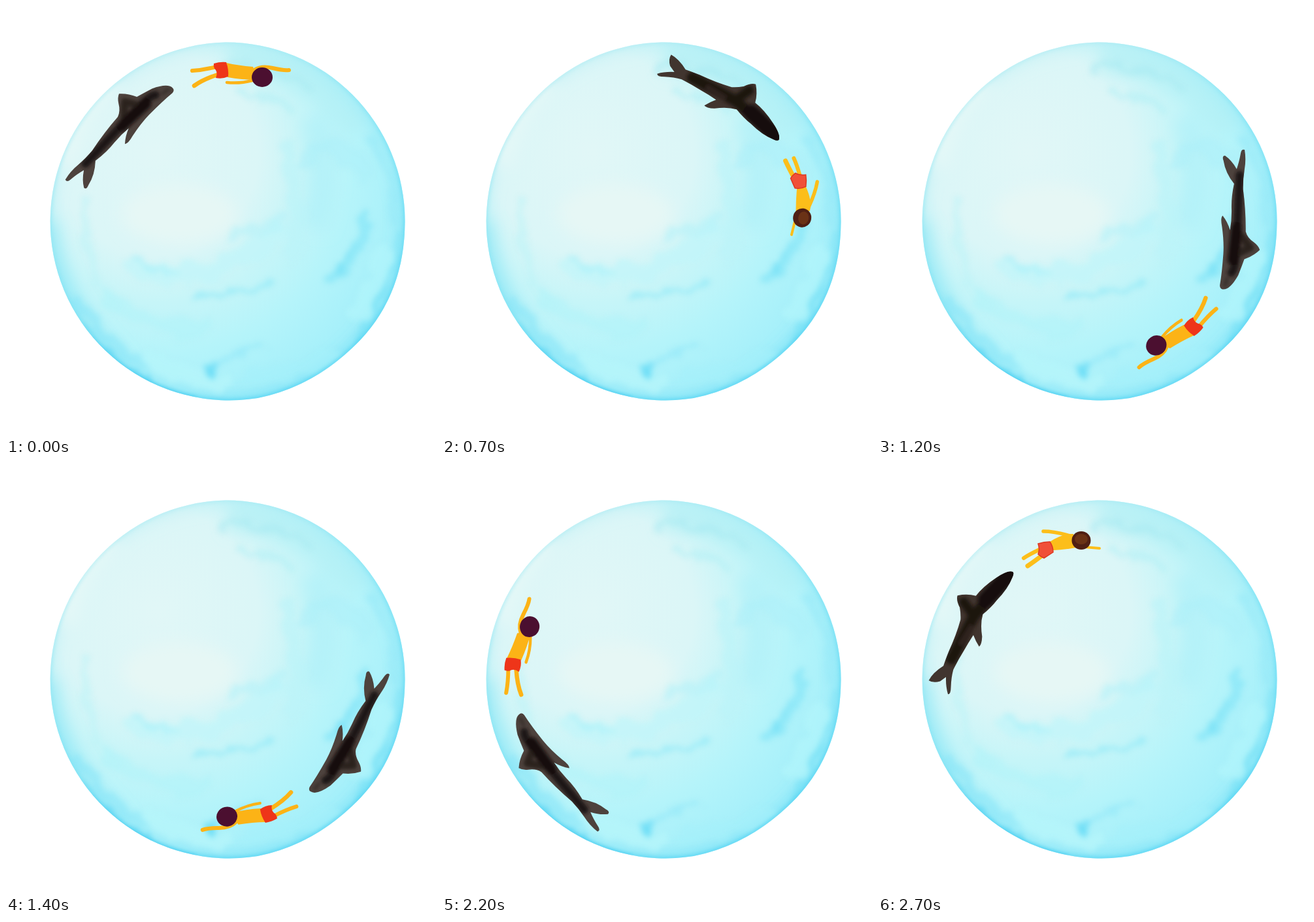
An HTML page for the animation above (2800 ms loop, 658 by 658 pixels).

```html
<!DOCTYPE html>
<html lang="en">
<head>
<meta charset="utf-8">
<title>Shark and swimmer</title>
<style>
  html, body { margin: 0; width: 100%; height: 100%; overflow: hidden; background: #fff; }
  svg { display: block; width: 100vw; height: 100vh; }
</style>
</head>
<body>
<svg viewBox="0 0 658 658">
  <defs>
    <radialGradient id="water" gradientUnits="userSpaceOnUse" cx="230" cy="225" r="410">
      <stop offset="0" stop-color="#e1f7f7"/>
      <stop offset=".38" stop-color="#dbf6f7"/>
      <stop offset=".56" stop-color="#c6f5f8"/>
      <stop offset=".75" stop-color="#b5f4fa"/>
      <stop offset="1" stop-color="#a3effa"/>
    </radialGradient>
    <linearGradient id="rim" x1=".1" y1=".1" x2=".6" y2="1">
      <stop offset="0" stop-color="#b8eff5"/>
      <stop offset=".5" stop-color="#7ee3f5"/>
      <stop offset="1" stop-color="#4fd2f3"/>
    </linearGradient>
    <clipPath id="disc"><path id="edge" d="M336 55.5A274 274 0 0 1 610.5 330Q610 450 528 525Q465 584 385 600A274 274 0 1 1 336 55.5Z"/></clipPath>
    <filter id="wash" filterUnits="userSpaceOnUse" x="0" y="0" width="658" height="658" color-interpolation-filters="sRGB">
      <feTurbulence type="fractalNoise" baseFrequency=".03" numOctaves="4" seed="4"/>
      <feDisplacementMap in="SourceGraphic" scale="34" xChannelSelector="R" yChannelSelector="G"/>
      <feGaussianBlur stdDeviation="4.5"/>
    </filter>
    <filter id="soft" filterUnits="userSpaceOnUse" x="0" y="0" width="658" height="658"><feGaussianBlur stdDeviation="12"/></filter>
    <filter id="fine" filterUnits="userSpaceOnUse" x="0" y="0" width="658" height="658"><feGaussianBlur stdDeviation="2.5"/></filter>
  </defs>

  <g clip-path="url(#disc)">
    <rect width="658" height="658" fill="url(#water)"/>
    <g filter="url(#soft)" fill="none">
      <circle cx="336.5" cy="330" r="280" stroke="url(#rim)" stroke-width="24" opacity=".5"/>
      <ellipse cx="265" cy="318" rx="88" ry="46" fill="#e6f7f5"/>
      <path d="M160 110Q100 170 90 245" stroke="#e4f8f7" stroke-width="34"/>
      <path d="M66 330Q72 450 180 552" stroke="#86e5f6" stroke-width="26" opacity=".6"/>
      <path d="M340 82Q470 90 540 190" stroke="#b3eff5" stroke-width="40" opacity=".7"/>
      <path d="M470 170Q500 260 470 340" stroke="#aef1f9" stroke-width="40" opacity=".6"/>
    </g>
    <g id="strokes" filter="url(#wash)" fill="none" stroke-linecap="round"></g>
    <use href="#edge" fill="none" stroke="url(#rim)" stroke-width="5" opacity=".7" filter="url(#fine)"/>
    <path d="M130 508Q190 578 290 600" fill="none" stroke="#28bfee" stroke-width="3" opacity=".7" filter="url(#fine)"/>
  </g>
  <g id="shark"></g>
  <g id="swimmer"></g>
</svg>

<script>
const $ = id => document.getElementById(id);
const STEPS = 28, STEP_MS = 100, CX = 336, CY = 330, DEG = Math.PI / 180;

// Brush strokes in the water: path, colour, width, opacity
const strokes = [
  ["M195 400Q300 440 420 345", "#c0f5f9", 30, .7],
  ["M205 385Q235 410 262 410", "#a8f0f8", 10, .6],
  ["M285 445Q345 452 400 425", "#92eaf7", 10, .65],
  ["M345 350Q390 350 420 330", "#b6f2f8", 18, .6],
  ["M122 300Q118 400 170 470", "#bcf3f8", 14, .5],
  ["M150 440Q205 500 310 490", "#aff3fa", 24, .5],
  ["M110 450Q145 505 205 545", "#8be5f7", 18, .55],
  ["M120 505Q165 548 215 578", "#5fd6f4", 16, .65],
  ["M220 540Q270 572 330 578", "#b6f6fb", 24, .8],
  ["M318 550L317 560", "#62d9f5", 11, .8],
  ["M320 552Q350 535 390 518", "#93e8f8", 10, .6],
  ["M365 575Q430 560 500 535", "#a6f0fa", 24, .6],
  ["M430 215Q450 320 440 385", "#bbf3f9", 24, .6],
  ["M460 240Q480 180 550 255", "#abeffa", 26, .5],
  ["M560 205Q598 260 594 330", "#98eaf8", 15, .55],
  ["M500 420Q540 385 553 325", "#84e5f7", 18, .65],
  ["M505 415Q522 395 530 365", "#70def6", 7, .55],
  ["M575 380Q575 430 530 475", "#b3f5fb", 28, .7],
  ["M600 350Q597 440 535 510", "#72dff6", 10, .6],
  ["M330 95Q390 82 460 125", "#a5eaf2", 9, .5],
  ["M365 135Q400 128 440 160", "#b0eff5", 10, .5]
];
$("strokes").innerHTML = strokes.map(([d, c, w, o]) =>
  `<path d="${d}" stroke="${c}" stroke-width="${w}" opacity="${o}"/>`).join("");

const line = (d, w, c) =>
  `<path d="${d}" fill="none" stroke="${c}" stroke-width="${w}" stroke-linecap="round" stroke-linejoin="round"/>`;
const shape = (d, c) => `<path d="${d}" fill="${c}"/>`;

// Body with darker paint pooled along the middle
const shark = (id, body, base, dark) => `
  <clipPath id="${id}"><path d="${body}"/></clipPath>
  ${shape(body, base)}
  <g clip-path="url(#${id})"><g filter="url(#fine)">${dark}</g></g>`;

const sharkA = shark("glide",
  "M422 117Q422 106 397 97Q383 94 371 92Q364 79 353 71Q347 74 343 82Q338 93 329 97Q298 102 266 112Q250 115 236 115Q220 115 206 120Q205 125 212 125Q226 125 237 127Q225 137 220 148Q221 153 228 149Q246 143 260 127Q282 128 300 124Q316 121 331 121Q319 127 311 136Q315 139 328 134Q350 127 368 125Q398 122 417 122Q422 121 422 117Z",
  "#4d423d",
  line("M245 121Q300 114 345 108T395 108", 12, "#1d1513") +
  line("M335 105L352 86L362 100", 11, "#2c211e") +
  line("M325 112L375 109", 16, "#130c0b") +
  line("M405 113L415 114", 6, "#3b302d"));

const sharkB = shark("dive",
  "M548 291Q554 285 551 264Q548 240 540 224Q549 214 553 199Q548 194 535 194Q525 191 518 187Q500 171 482 149Q473 139 466 132Q464 113 456 102Q449 106 447 117L449 128Q436 121 424 119Q422 123 432 128Q445 135 454 143Q464 156 472 169Q481 182 488 194Q478 193 468 194Q469 199 480 205Q499 211 510 221Q514 238 520 250Q528 273 541 287Q545 292 548 291Z",
  "#41352f",
  line("M470 148L514 208L540 268", 17, "#1b1311") +
  line("M512 208L540 203", 14, "#1a1210") +
  line("M528 235L546 282", 24, "#150e0d") +
  line("M485 172L500 196", 9, "#2e231f"));

const A_SKIN = "#fcb316", B_SKIN = "#fcbe1a";
const swimmerA =
  line("M285 99Q302 98 322 93", 6, A_SKIN) +
  line("M288 122Q302 112 324 105", 6.5, A_SKIN) +
  line("M338 117Q358 119 377 114", 4.5, A_SKIN) +
  shape("M337 87Q355 91 378 93L384 113Q360 113 339 109Z", A_SKIN) +
  line("M380 98Q391 91 408 95T433 98", 6, A_SKIN) +
  shape("M318 88Q328 85 337 86Q341 97 340 108Q331 112 321 110Q324 103 321 98Q317 94 318 88Z", "#ee3519") +
  `<ellipse cx="392" cy="109" rx="16" ry="15" fill="#4b0f30"/>`;

const swimmerB =
  line("M223 144Q232 138 247 131", 6, B_SKIN) +
  line("M229 156Q238 150 251 140", 7, B_SKIN) +
  line("M253 103Q270 103 294 110", 5.5, B_SKIN) +
  shape("M263 119Q282 106 299 107L303 128Q285 131 268 132Z", B_SKIN) +
  line("M316 127L339 129", 4, B_SKIN) +
  `<path d="M245 122Q254 119 263 119Q268 126 268 135Q262 139 254 144Q249 142 245 138Q248 131 245 122Z" fill="#f05038" stroke="#dc3822" stroke-width="1.5"/>
   <ellipse cx="311" cy="117" rx="14.5" ry="14" fill="#4f1f14"/>
   <ellipse cx="311" cy="115" rx="10" ry="8" fill="#713716" opacity=".8"/>`;

// Keys: step, x, y, heading. Two drawings alternate; "draw" is the key at which each was drawn.
const cast = [
  { node: $("shark"), art: [sharkA, sharkB], draw: [1, 0], keys: [
    [[0, 180.5, 198.8, -44.7], [4, 317.8, 125.5, -5.2], [14, 518.5, 410.8, 119.7],
     [18, 391.3, 522.5, 168.1], [22, 182.3, 465.5, 232.1]],
    [[9, 494.3, 202, 58.4], [27, 150.3, 252.5, 302.1]]] },
  { node: $("swimmer"), art: [swimmerA, swimmerB], draw: [0, 1], keys: [
    [[0, 359.5, 104, -5.3], [4, 500.3, 186.5, 46], [14, 370.8, 536.8, 161.1],
     [18, 191.8, 485.5, 210.1], [22, 121.3, 279.3, 278.9]],
    [[9, 532, 379.5, 110.9], [27, 282.3, 140.5, 348.9]]] }
];

const LAP = [STEPS, 360, 0, 360];
const near = a => a - 360 * Math.round(a / 360);
const mix = (a, b, u) => a + (b - a) * u;

// Step, angle round the pool, radius, heading
function polar(keys) {
  let last = -400;
  return keys.map(([k, x, y, rot]) => {
    let a = Math.atan2(y - CY, x - CX) / DEG;
    if (last > -400) while (a < last) a += 360;
    last = a;
    return [k, a, Math.hypot(x - CX, y - CY), rot];
  });
}

// Smooth closed curve through the keys
function curve(keys, k) {
  const n = keys.length;
  const at = i => {
    const lap = Math.floor(i / n);
    return keys[i - lap * n].map((v, c) => v + lap * LAP[c]);
  };
  let i = 0;
  while (at(i + 1)[0] <= k) i++;
  const [p, q, r, s] = [at(i - 1), at(i), at(i + 1), at(i + 2)];
  const h = r[0] - q[0], u = (k - q[0]) / h;
  return q.map((v, c) => {
    const m = (r[c] - p[c]) / (r[0] - p[0]) * h;
    const w = (s[c] - q[c]) / (s[0] - q[0]) * h;
    const d = r[c] - v;
    return v + u * (m + u * (3 * d - 2 * m - w + u * (m + w - 2 * d)));
  });
}

for (const c of cast) {
  c.main = polar(c.keys[0]);
  c.shift = polar(c.keys[1]).map(b => {
    const a = curve(c.main, b[0]);
    return [b[0], near(b[1] - a[1]), b[2] - a[2], near(b[3] - a[3])];
  });
  c.node.innerHTML = c.art.map(s => `<g>${s}</g>`).join("");
}

function place(c, k) {
  const pose = k % 2, p = curve(c.main, k);
  if (pose) {
    const [a, b] = c.shift, gap = b[0] - a[0];
    const d = (k - a[0] + STEPS) % STEPS;
    const u = d <= gap ? d / gap : (STEPS - d) / (STEPS - gap);
    for (let i = 1; i < 4; i++) p[i] += mix(a[i], b[i], u);
  }
  const [, ang, rad, rot] = p;
  const [, x0, y0, rot0] = c.keys[pose][c.draw[pose]];
  const x = CX + rad * Math.cos(ang * DEG), y = CY + rad * Math.sin(ang * DEG);
  c.node.setAttribute("transform",
    `translate(${x.toFixed(2)} ${y.toFixed(2)}) rotate(${(rot - rot0).toFixed(2)}) translate(${-x0} ${-y0})`);
  [...c.node.children].forEach((g, i) => g.setAttribute("display", i === pose ? "inline" : "none"));
}

let shown = -1;
function tick() {
  const k = Math.floor(performance.now() / STEP_MS) % STEPS;
  if (k !== shown) {
    shown = k;
    cast.forEach(c => place(c, k));
  }
  requestAnimationFrame(tick);
}
tick();
</script>
</body>
</html>
```
